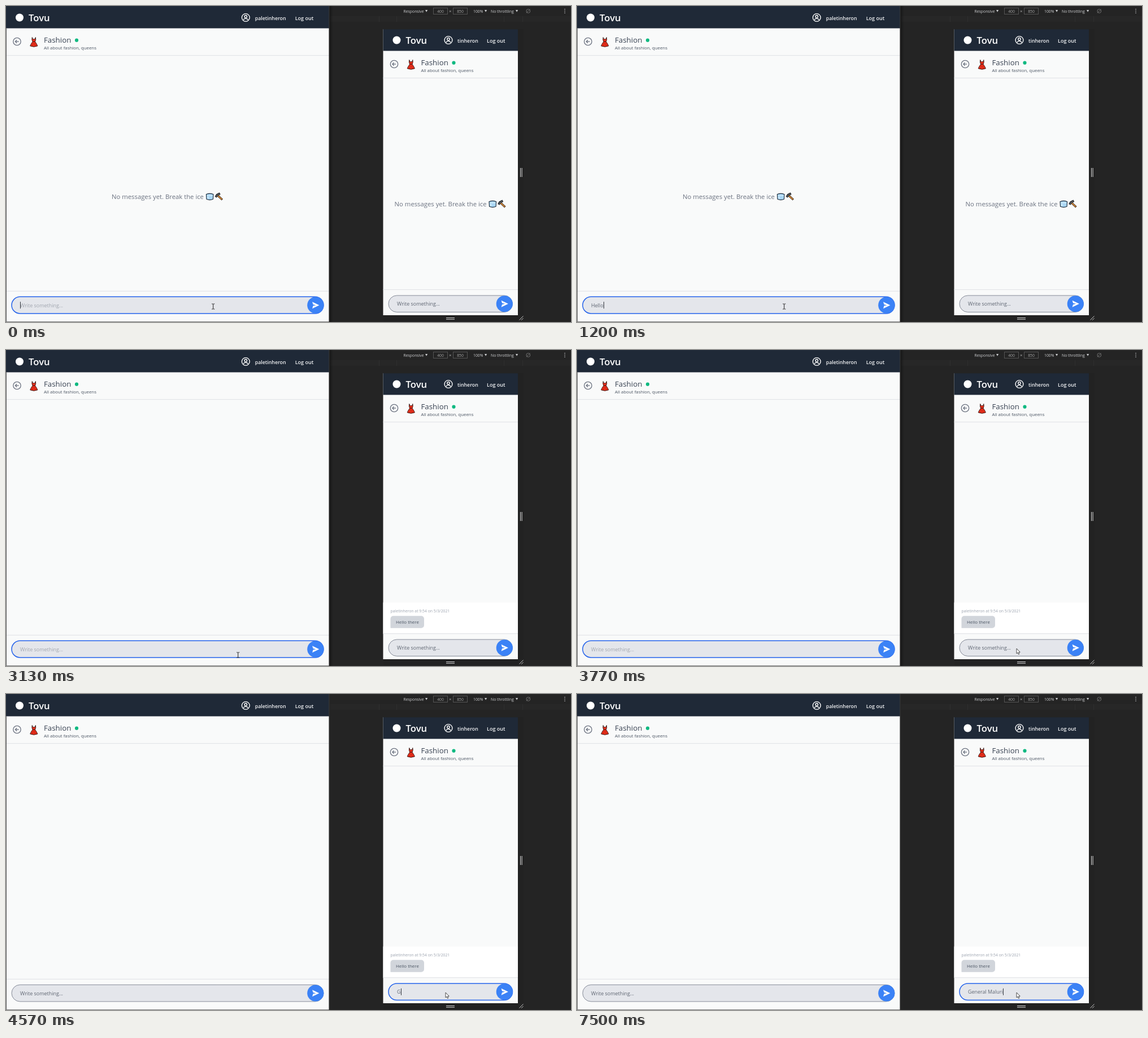
These frames come from a looping animation (1000x560 px, 8 s). An HTML page with a canvas:

```html
<!DOCTYPE html>
<html lang="en">
<head>
<meta charset="utf-8">
<title>Chat demo</title>
<style>
  html, body { margin: 0; width: 100%; height: 100%; overflow: hidden; background: #242424; }
  canvas { display: block; width: 1000px; height: 560px; }
</style>
</head>
<body>
<canvas id="stage" width="1000" height="560"></canvas>
<script>
const ctx = document.getElementById('stage').getContext('2d');
const LOOP = 8000;
const BLUE = '#2563eb', GRAY = '#6b7280', PAGE = '#f9fafa', NAVY = '#1f2937', LINE = '#e3e5e8';

// Moments of the story, in ms
const SENT = 2600, LEFT_CLEAR = 2670, DELIVERED = 2770, SWITCH = 3930;
const HELLO = { text: 'Hello there', keys: [430, 600, 770, 830, 1200, 1500, 1670, 1770, 1870, 1930, 2030] };
const REPLY = { text: 'General Maluri', keys: [4470, 5100, 5430, 5500, 5870, 6030, 6170, 6300, 6570, 6700, 6870, 7000, 7330, 7500] };
const POINTER = [
  [0, 366, 532], [3130, 410, 540], [3200, 525, 548], [3270, 640, 547], [3370, 735, 538],
  [3430, 780, 531], [3570, 789, 533], [3670, 784, 532], [3770, 778, 529]
];

function rect(x, y, w, h, color) {
  ctx.fillStyle = color;
  ctx.fillRect(x, y, w, h);
}

function text(str, x, y, size, color, weight = 400, align = 'left') {
  ctx.font = `${weight} ${size}px "Open Sans", "Noto Sans", sans-serif`;
  ctx.textAlign = align;
  ctx.fillStyle = color;
  ctx.fillText(str, x, y);
}

function disc(x, y, r, color) {
  ctx.fillStyle = color;
  ctx.beginPath();
  ctx.arc(x, y, r, 0, Math.PI * 2);
  ctx.fill();
}

function ring(x, y, r, color, width) {
  ctx.strokeStyle = color;
  ctx.lineWidth = width;
  ctx.beginPath();
  ctx.arc(x, y, r, 0, Math.PI * 2);
  ctx.stroke();
}

function trace(points, close) {
  ctx.beginPath();
  points.forEach(([x, y]) => ctx.lineTo(x, y));
  if (close) ctx.closePath();
}

function shape(points, fill) {
  trace(points, true);
  ctx.fillStyle = fill;
  ctx.fill();
}

function stroke(points, color, width) {
  trace(points);
  ctx.strokeStyle = color;
  ctx.lineWidth = width;
  ctx.stroke();
}

function at(x, y, draw) {
  ctx.save();
  ctx.translate(x, y);
  draw();
  ctx.restore();
}

function userIcon() {
  ring(0, 0, 6.9, '#fff', 1.4);
  ring(0, -1.8, 2.2, '#fff', 1.4);
  ctx.beginPath();
  ctx.arc(0, 6.2, 4.6, Math.PI * 1.14, Math.PI * 1.86);
  ctx.stroke();
}

function backIcon() {
  ring(0, 0, 6.7, GRAY, 1.3);
  stroke([[3.2, 0], [-3, 0]], GRAY, 1.3);
  stroke([[-0.3, -2.8], [-3.1, 0], [-0.3, 2.8]], GRAY, 1.3);
}

function dress() {
  ctx.beginPath();
  ctx.moveTo(-3, -8.5);
  ctx.lineTo(-2.2, -5.8);
  ctx.quadraticCurveTo(0, -4.4, 2.2, -5.8);
  ctx.lineTo(3, -8.5);
  ctx.lineTo(3.4, -4.5);
  ctx.lineTo(2.2, -0.8);
  ctx.quadraticCurveTo(5.2, 3, 6.6, 6.8);
  ctx.quadraticCurveTo(0, 9.8, -6.6, 6.8);
  ctx.quadraticCurveTo(-5.2, 3, -2.2, -0.8);
  ctx.lineTo(-3.4, -4.5);
  ctx.closePath();
  ctx.fillStyle = '#ea2f1b';
  ctx.fill();
  ctx.strokeStyle = '#2b1210';
  ctx.lineWidth = 0.9;
  ctx.stroke();
  rect(-2.3, -1.5, 4.6, 1.1, '#4a1512');
  stroke([[-1, 1], [-2.6, 7]], '#b31d12', 0.7);
  stroke([[1, 1], [2.6, 7]], '#b31d12', 0.7);
}

function iceCube() {
  ctx.beginPath();
  ctx.moveTo(-6.3, -4.3);
  ctx.quadraticCurveTo(0, -7, 6.3, -4.3);
  ctx.lineTo(5.8, 4.2);
  ctx.quadraticCurveTo(0, 7, -5.8, 4.2);
  ctx.closePath();
  ctx.fillStyle = '#a9d6f5';
  ctx.fill();
  ctx.strokeStyle = '#1d2a38';
  ctx.lineWidth = 1.1;
  ctx.stroke();
  rect(-4.6, -2.6, 9.2, 1, '#e2f3ff');
  rect(-4.2, 0, 2.2, 3.4, '#d3ecfd');
}

function hammer() {
  stroke([[-2.6, -2.4], [5.8, 5.3]], '#2a1a10', 3.4);
  stroke([[-2.4, -2.2], [5.2, 4.8]], '#d58a3c', 1.9);
  stroke([[-5.8, 0.8], [-3.4, -3.2], [1.8, -5.8]], '#24272b', 3.8);
  stroke([[-5.2, 0], [-3.4, -2.9], [0.8, -5.1]], '#62676c', 1.4);
}

function emptyNote(x, y) {
  text('No messages yet. Break the ice', x, y, 11.3, GRAY);
  at(x + 173.7, y - 4, iceCube);
  at(x + 190, y - 4, hammer);
}

// Title bar and room heading; (x, y) is the window's corner
function heading(x, y, width, user, iconX, nameX, logoutX) {
  rect(x, y, width, 39.5, NAVY);
  disc(x + 24, y + 20.5, 7, '#fff');
  text('Tovu', x + 40, y + 27, 16.7, '#fff', 600);
  at(iconX, y + 20.5, userIcon);
  text(user, nameX, y + 25, 8.8, '#f3f4f6', 600);
  text('Log out', logoutX, y + 25, 9, '#f3f4f6', 600);
  at(x + 19.5, y + 63, backIcon);
  at(x + 49.3, y + 64, dress);
  text('Fashion', x + 67, y + 64.6, 13.3, '#374151');
  disc(x + 125, y + 60.7, 3.1, '#10b981');
  text('All about fashion, queens', x + 67, y + 76.6, 7.88, '#4b5563');
  rect(x, y + 87, width, 1.2, LINE);
}

function inputBox(x, y, w, h, focused, typed, caret) {
  ctx.beginPath();
  ctx.roundRect(x, y, w, h, h / 2);
  ctx.fillStyle = '#e4e6eb';
  ctx.fill();
  ctx.strokeStyle = focused ? BLUE : GRAY;
  ctx.lineWidth = focused ? 1.5 : 0.8;
  ctx.stroke();

  const tx = x + 15, base = y + h / 2 + 3.6;
  text(typed || 'Write something...', tx, base, 8.95, focused && !typed ? '#a1a6af' : '#5f6672');
  if (caret) {
    const end = typed ? ctx.measureText(typed).width : 0;
    rect(Math.round(tx + end), base - 9.6, 1, 12, '#30343b');
  }

  at(x + w - 14.2, y + h / 2, () => {
    disc(0, 0, 14.6, '#3b82f6');
    shape([[-5.7, -6], [6.6, 0], [-5.7, 6], [-4.3, 1.2], [1, 0], [-4.3, -1.2]], '#fff');
  });
}

function typedAt(line, t) {
  return line.text.slice(0, line.keys.filter(k => k <= t).length);
}

function dropdown(label, x, arrowX) {
  text(label, x, 11.8, 6.85, '#cfd0d2');
  shape([[arrowX, 7], [arrowX + 4.2, 7], [arrowX + 2.1, 10.8]], '#cfd0d2');
}

function sizeField(label, x) {
  ctx.strokeStyle = '#555';
  ctx.lineWidth = 1;
  ctx.strokeRect(x + 0.5, 3.5, 25, 11);
  text(label, x + 13, 11.8, 6.8, '#a8a8a8', 400, 'center');
}

function devTools(leftActive) {
  rect(571, 0, 429, 560, '#242424');
  rect(574, 18, 426, 10, '#272727');
  [660, 691, 881, 914].forEach(x => rect(x, 18, 1, 10, '#2f2f2f'));
  rect(906, 41, 10, 507, '#222');
  rect(668, 548, 238, 11, '#222');
  if (leftActive) {
    const shade = ctx.createLinearGradient(572, 0, 579, 0);
    shade.addColorStop(0, 'rgba(0,0,0,.4)');
    shade.addColorStop(1, 'rgba(0,0,0,0)');
    rect(572, 0, 7, 560, shade);
  }

  dropdown('Responsive', 703.5, 742);
  sizeField('400', 756);
  text('×', 786.4, 12.2, 8, '#b5b5b5', 400, 'center');
  sizeField('850', 791);
  dropdown('100%', 827, 847);
  dropdown('No throttling', 858, 902);
  ring(924.3, 9, 3.4, '#777', 0.9);
  stroke([[921, 12.4], [927.6, 5.6]], '#777', 0.9);
  [5.8, 9, 12.2].forEach(y => disc(989, y, 0.8, '#cfd0d2'));

  [910, 912.6].forEach(x => rect(x, 287, 1.1, 16, '#c8c8c8'));
  [552, 554.7].forEach(y => rect(779, y, 15, 1.1, '#c8c8c8'));
  stroke([[908.5, 556.5], [915.5, 549.5]], '#c8c8c8', 1);
  stroke([[912, 556.8], [915.5, 553.3]], '#c8c8c8', 1);
}

function leftWindow(t) {
  rect(0, 0, 572, 560, PAGE);
  heading(0, 0, 572, 'paletinheron', 424.3, 440.7, 511.7);
  if (t < LEFT_CLEAR) emptyNote(187, 342);
  rect(0, 504.7, 572, 1.2, LINE);
  const typed = t < SENT ? typedAt(HELLO, t) : '';
  inputBox(10, 515.3, 552, 29.7, t < SWITCH, typed, t < SENT);
  rect(0, 39, 1, 521, '#555');
  rect(0, 559, 572, 1, '#777');
  rect(571.4, 0, 1, 560, '#3a3a3a');
}

function phone(t) {
  rect(667.5, 41, 238.5, 507, PAGE);
  at(0.5, 0, () => heading(667, 40, 238.5, 'tinheron', 782.5, 798.5, 850.5));
  rect(667.5, 40, 238.5, 1.3, '#242424');
  if (t < DELIVERED) {
    emptyNote(687.6, 355);
  } else {
    rect(667.5, 447.5, 238.5, 55, '#fff');
    text('paletinheron at 9:54 on 5/3/2021', 680.6, 464.8, 6.85, '#9ca3af');
    ctx.beginPath();
    ctx.roundRect(680.5, 471.3, 59.5, 21.5, [5, 5, 5, 0.5]);
    ctx.fillStyle = '#d1d5db';
    ctx.fill();
    text('Hello there', 690, 485, 7.95, '#4b5563');
  }
  rect(667.5, 502, 238.5, 1.2, LINE);
  inputBox(677, 513, 219.5, 29.5, t >= SWITCH, typedAt(REPLY, t), t >= SWITCH);
}

function pointer(t) {
  const [, x, y] = POINTER.filter(p => p[0] <= t).pop();
  const beam = x < 530 && y < 545;
  at(x, y, () => {
    if (beam) {
      rect(0.2, -4, 1, 9, '#222');
      rect(-1.8, -4.6, 2, 1, '#222');
      rect(1.2, -4.6, 2, 1, '#222');
      rect(-1.8, 4.6, 2, 1, '#222');
      rect(1.2, 4.6, 2, 1, '#222');
      return;
    }
    const arrow = [[0, 0], [0, 9], [2, 7.2], [3.4, 10.4], [4.9, 9.7], [3.6, 6.7], [6.2, 6.5]];
    shape(arrow, '#fff');
    ctx.strokeStyle = '#222';
    ctx.lineWidth = 0.8;
    ctx.stroke();
  });
}

function frame(now) {
  const t = now % LOOP;
  devTools(t < SWITCH);
  leftWindow(t);
  phone(t);
  pointer(t);
  requestAnimationFrame(frame);
}

frame(0);
</script>
</body>
</html>
```
